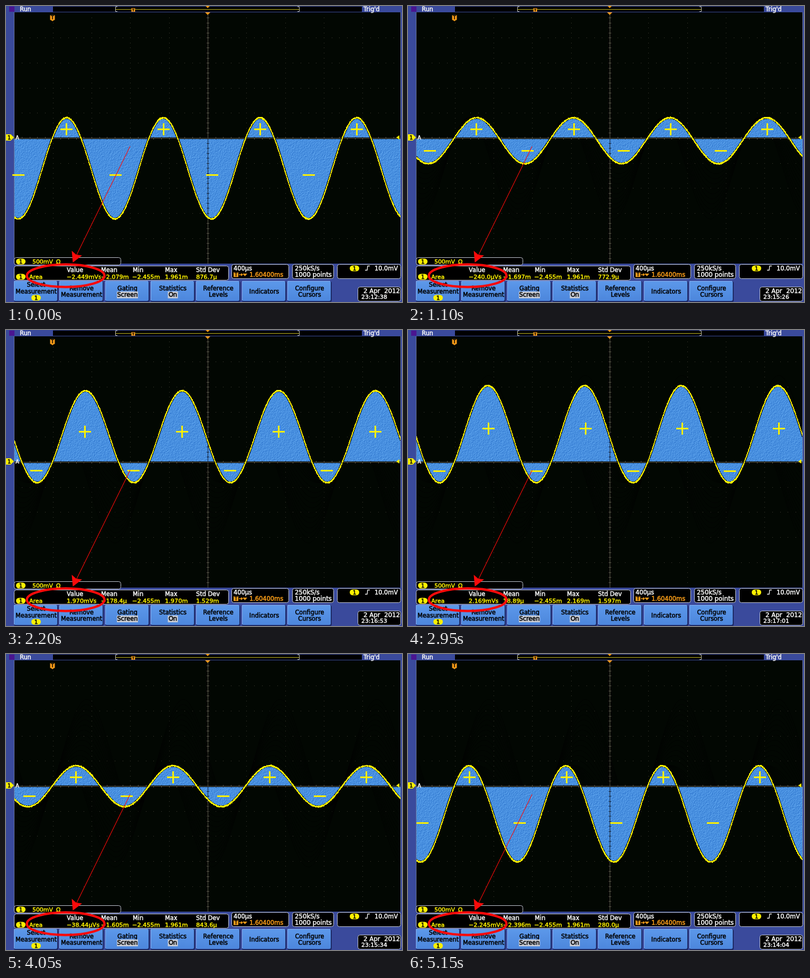
Animation, 750 px wide and 563 px high, one loop 5250 ms. Source, as an HTML page with a canvas:

```html
<!DOCTYPE html>
<html lang="en">
<head>
<meta charset="utf-8">
<title>Oscilloscope area measurement</title>
<style>
html, body { margin: 0; width: 100%; height: 100%; overflow: hidden; background: #3a4a9c; }
canvas { display: block; }
</style>
</head>
<body>
<canvas id="scope" width="750" height="563"></canvas>
<script>
const ctx = document.getElementById('scope').getContext('2d');
const YELLOW = '#fcf000', ORANGE = '#f59a18', WHITE = '#f4f4f4', RED = '#fa0a0a', DARK = '#020702';
const PLOT = { left: 15, top: 12, right: 748, bottom: 490 };
const WIDTH = PLOT.right - PLOT.left, HEIGHT = PLOT.bottom - PLOT.top;
const LEVEL = 250.5, AXIS_Y = 251, AXIS_X = 382, TRIGGER_X = 88, PERIOD = 183.1;
const GRID_X = 73.3 / 5, GRID_Y = 47.65 / 5;
const LOOP = 5250, LAST = 26;

// step, plus x, plus y, minus x, minus y, value, mean, deviation (mVs), seconds after 23:12
const KEYS = [
  [0, 114, 234, 24, 321, -2.449, -2.079, .8767, 38],
  [1, 116, 234, 28, 321, -2.245, -2.396, .28, 124],
  [7, 120.5, 236, 31, 297, -1.046, -2.063, .4899, 175],
  [12, 131.5, 234, 45, 270, -.03844, -1.605, .8436, 214],
  [15, 140.5, 221, 50, 270, .5663, -1.197, 1.087, 237],
  [22, 148.5, 193, 58, 267, 1.970, -.1784, 1.529, 293],
  [23, 151.5, 186.5, 60, 268, 2.169, .01889, 1.597, 301],
  [26, 153.5, 172, 61, 268, 2.769, .5512, 1.762, 325]
];

function stateAt(step) {
  const i = Math.max(1, KEYS.findIndex(k => k[0] >= step));
  const a = KEYS[i - 1], b = KEYS[i];
  if (step === b[0]) return b;
  const f = (step - a[0]) / (b[0] - a[0]);
  return a.map((v, n) => v + (b[n] - v) * f);
}

function hash(n) {
  const v = Math.sin(n * 127.1 + 11.7) * 43758.5453;
  return v - Math.floor(v);
}

// The trough rises first, then the crest; the rising edge stays at the trigger.
function waveAt(step, inset = 0) {
  const top = 212.5 - 9.7 * Math.max(0, step - 12);
  const bottom = 405 - 9.55 * Math.min(12, step);
  const mid = (top + bottom) / 2, amp = (bottom - top) / 2;
  const phase = Math.asin((mid - LEVEL) / amp);
  return x => mid - (amp - inset) * Math.sin(phase + (x - TRIGGER_X) * 2 * Math.PI / PERIOD);
}

function makeTexture() {
  const size = 128, tile = document.createElement('canvas');
  tile.width = tile.height = size;
  const c = tile.getContext('2d'), img = c.createImageData(size, size);
  const at = (x, y) => hash(((y + size) % size) * size + (x + size) % size);
  const soft = (x, y) => (at(x, y) * 2 + at(x + 1, y) + at(x, y + 1)) / 4;
  for (let y = 0; y < size; y++) for (let x = 0; x < size; x++) {
    const d = (soft(x + 1, y + 1) - soft(x, y)) * 46;
    img.data.set([72 + d, 143 + d, 223 + d * .7, 255], (y * size + x) * 4);
  }
  c.putImageData(img, 0, 0);
  return ctx.createPattern(tile, 'repeat');
}
const texture = makeTexture();

function rect(x, y, w, h, color) {
  ctx.fillStyle = color;
  ctx.fillRect(x, y, w, h);
}

function shape(points, color) {
  ctx.fillStyle = color;
  ctx.beginPath();
  points.forEach(([x, y]) => ctx.lineTo(x, y));
  ctx.fill();
}

function line(points, color, width = 1) {
  ctx.strokeStyle = color;
  ctx.lineWidth = width;
  ctx.beginPath();
  points.forEach(([x, y]) => ctx.lineTo(x, y));
  ctx.stroke();
}

function text(str, x, y, color = WHITE, size = 11.4, align = 'left') {
  ctx.font = size + 'px "DejaVu Sans", sans-serif';
  ctx.textAlign = align;
  ctx.fillStyle = ctx.strokeStyle = color;
  ctx.lineWidth = .55;
  ctx.lineJoin = 'round';
  ctx.fillText(str, x, y);
  ctx.strokeText(str, x, y);
  ctx.lineJoin = 'miter';
}

function box(x, y, w, h) {
  ctx.beginPath();
  ctx.roundRect(x + .5, y + .5, w - 1, h - 1, 4);
  ctx.fillStyle = '#000';
  ctx.fill();
  ctx.strokeStyle = '#c4c8d4';
  ctx.lineWidth = 1;
  ctx.stroke();
}

function badge(x, y) {
  ctx.fillStyle = YELLOW;
  ctx.beginPath();
  ctx.roundRect(x - 9, y - 5.5, 18, 11, 5.5);
  ctx.fill();
  text('1', x, y + 4, '#000', 10.5, 'center');
}

function triggerTag(x, y, size) {
  rect(x - size / 2, y - size / 2, size, size, ORANGE);
  text('T', x, y + size * .36, '#000', size * .95, 'center');
}

function drawGrid() {
  rect(PLOT.left, PLOT.top, WIDTH, HEIGHT, DARK);
  for (let i = -24; i <= 24; i++) for (let j = -24; j <= 24; j++) {
    if (i % 5 && j % 5) continue;
    rect(Math.round(AXIS_X + i * GRID_X), Math.round(AXIS_Y + j * GRID_Y), 1, 1, '#48463a');
  }
  drawAxes('#5c574b');
}

function drawAxes(color) {
  rect(PLOT.left, AXIS_Y, WIDTH, 1, color);
  rect(AXIS_X, PLOT.top, 1, HEIGHT, color);
  for (let i = -24; i <= 24; i++) {
    rect(Math.round(AXIS_X + i * GRID_X), AXIS_Y - 2, 1, 5, color);
    rect(AXIS_X - 2, Math.round(AXIS_Y + i * GRID_Y), 5, 1, color);
  }
}

function pathWave(wave) {
  ctx.beginPath();
  for (let x = PLOT.left; x <= PLOT.right; x++) ctx.lineTo(x, wave(x));
}

function strokeWave(wave, color, width) {
  pathWave(wave);
  ctx.strokeStyle = color;
  ctx.lineWidth = width;
  ctx.stroke();
}

// One noisy upright dash per column, as the sampled signal looks on screen
function drawTrace(wave, seed) {
  for (let x = PLOT.left; x < PLOT.right; x++) {
    const a = wave(x), b = wave(x + 1);
    const top = Math.min(a, b) - .8 - 1.4 * hash(x + seed * 971);
    const bottom = Math.max(a, b) + .8 + 1.4 * hash(x + seed * 389 + .5);
    rect(x, Math.round(top), 1, Math.round(bottom) - Math.round(top), YELLOW);
  }
}

function fillAreas(step) {
  ctx.save();
  pathWave(waveAt(step, 2));
  ctx.lineTo(PLOT.right, AXIS_Y);
  ctx.lineTo(PLOT.left, AXIS_Y);
  ctx.closePath();
  ctx.clip();
  rect(PLOT.left, PLOT.top, WIDTH, AXIS_Y - 1 - PLOT.top, texture);
  rect(PLOT.left, AXIS_Y + 2, WIDTH, PLOT.bottom - AXIS_Y - 2, texture);
  drawAxes('#142238');
  ctx.restore();
  rect(PLOT.left, AXIS_Y, WIDTH, 1, '#5c574b');
}

function drawSigns(px, py, mx, my) {
  for (const shift of [0, 184.3, 367.2, 550.3]) {
    const x = Math.round(px + shift), m = Math.round(mx + shift);
    const y = Math.round(py), n = Math.round(my);
    rect(x - 11, y - 1, 23, 3, YELLOW);
    rect(x - 1, y - 11, 3, 23, YELLOW);
    rect(m - 12, n - 1, 23, 3, YELLOW);
  }
}

function drawPlot(index, step, state) {
  const wave = waveAt(step);
  drawGrid();
  ctx.save();
  ctx.beginPath();
  ctx.rect(PLOT.left, PLOT.top, WIDTH, HEIGHT);
  ctx.clip();
  // Faint dark afterglow of the earlier traces
  for (let i = 0; i < Math.min(index, LAST); i++) strokeWave(waveAt(i), 'rgba(0,0,0,.4)', 1.5);
  fillAreas(step);
  strokeWave(wave, DARK, 4);
  drawTrace(wave, step + 1);
  ctx.restore();
  line([[15.5, 12], [15.5, 490]], '#68749c');
  line([[747.5, 12], [747.5, 490]], '#68749c');
  drawSigns(...state.slice(1, 5));
}

function drawMarkers() {
  rect(6, 1, 10, 10, '#4a1590');
  text('Run', 26, 10);
  text('Trig\'d', 677, 10);
  rect(89, 1, 585, 10, '#000');
  line([[207, 6.5], [555, 6.5]], '#c4b820');
  line([[211, 1.5], [207.5, 1.5], [207.5, 10.5], [211, 10.5]], '#c8c8b8');
  line([[552, 1.5], [555.5, 1.5], [555.5, 10.5], [552, 10.5]], '#c8c8b8');
  triggerTag(241, 7.5, 7);
  shape([[378, 0], [386, 0], [382, 4]], ORANGE);
  shape([[377, 12], [387, 12], [382, 17]], ORANGE);
  triggerTag(88, 22, 9);
  shape([[84, 26], [92, 26], [88, 29]], ORANGE);
  shape([[0, 244], [9, 244], [15, 250], [9, 256], [0, 256]], YELLOW);
  text('1', 6, 254, '#000', 10.5, 'center');
  text('A', 18, 254, WHITE, 10);
  shape([[739, 250], [745, 246], [745, 254]], YELLOW);
}

function amount(v) {
  const str = Math.abs(v) >= 1 ? v.toFixed(3) + 'm' : (v * 1000).toPrecision(4) + 'µ';
  return str.replace('-', '−');
}

function drawReadout([, , , , , value, mean, dev, secs]) {
  box(15, 478, 203, 15);
  badge(28, 486);
  text('500mV', 50, 490, YELLOW, 10.9);
  text('Ω', 95, 490, YELLOW, 10.9);

  box(15, 494, 407, 28);
  ['Value', 'Mean', 'Min', 'Max', 'Std Dev'].forEach((name, i) =>
    text(name, [115, 180, 240, 301, 360][i], 506));
  badge(28, 515);
  text('Area', 44, 519, YELLOW, 11);
  ctx.save();
  ctx.beginPath();
  ctx.rect(100, 508, 79.5, 13);
  ctx.clip();
  text(amount(value) + 'Vs', 115, 519, YELLOW, 11.2);
  ctx.restore();
  [mean, -2.455, Math.max(1.961, value), dev].forEach((v, i) =>
    text(amount(v), [180, 239, 301, 360][i], 519, YELLOW, 11.3));

  box(427, 491, 109, 28);
  text('400µs', 431, 503);
  triggerTag(435.5, 511, 9);
  line([[441, 511], [446, 511]], ORANGE, 1.5);
  shape([[445, 508], [449, 511], [445, 514]], ORANGE);
  shape([[448, 509], [457, 509], [452.5, 514]], ORANGE);
  text('1.60400ms', 461, 515, ORANGE);

  box(542, 491, 79, 28);
  text('250kS/s', 547, 503, WHITE, 11.8);
  text('1000 points', 547, 515, WHITE, 11.8);

  box(627, 491, 121, 28);
  badge(660, 499);
  line([[680, 502.5], [684, 502.5], [685, 494.5], [689, 494.5]], WHITE, 1.4);
  text('10.0mV', 698, 503);

  const pad = n => String(n).padStart(2, '0'), s = Math.round(secs);
  box(666, 534, 82, 28);
  text('2 Apr  2012', 677, 546, WHITE, 11.8);
  text('23:' + pad(12 + Math.floor(s / 60)) + ':' + pad(s % 60), 673, 557, WHITE, 10.9);
}

function drawButtons() {
  const labels = [
    ['Select', 'Measurement'], ['Remove', 'Measurement'], ['Gating', 'Screen'],
    ['Statistics', 'On'], ['Reference', 'Levels'], ['Indicators'], ['Configure', 'Cursors']
  ];
  labels.forEach((words, i) => {
    const x = Math.round(15 + i * 86.3), mid = x + 42;
    ctx.fillStyle = '#1d2a66';
    ctx.beginPath();
    ctx.roundRect(x, 524, 84, 39, 3);
    ctx.fill();
    const face = ctx.createLinearGradient(0, 523, 0, 562);
    face.addColorStop(0, '#5c98ea');
    face.addColorStop(1, '#4c86dc');
    ctx.fillStyle = face;
    ctx.beginPath();
    ctx.roundRect(x, 523, 82, 38, 3);
    ctx.fill();
    line([[x + .5, 560], [x + .5, 523.5], [x + 81, 523.5]], '#86b2f2');
    const first = words.length === 1 ? 547 : i ? 541 : 534;
    words.forEach((word, row) => {
      const y = first + row * (i ? 12 : 13);
      if (row && (i === 2 || i === 3)) {
        const w = i === 2 ? 40 : 19;
        rect(mid - w / 2, 543, w, 13, '#c6cad4');
      }
      text(word, mid, y, '#000', 11.4, 'center');
    });
  });
  badge(57, 555);
}

function drawCallout() {
  ctx.strokeStyle = RED;
  ctx.lineWidth = 4.4;
  ctx.beginPath();
  ctx.ellipse(113, 513, 73.5, 21.5, 0, 0, 2 * Math.PI);
  ctx.stroke();
  line([[235, 267], [133, 475]], RED, 1.1);
  shape([[126.5, 488], [124.5, 465.5], [133, 473], [144, 474.5]], RED);
}

function draw(index) {
  const step = index <= LAST ? index : 2 * LAST - index;
  const state = stateAt(step);
  rect(0, 0, 750, 563, '#3a4a9c');
  drawPlot(index, step, state);
  drawMarkers();
  drawReadout(state);
  drawButtons();
  drawCallout();
}

// The topmost pose is held 50 ms longer than the others.
function indexAt(t) {
  return t < 2750 ? Math.min(LAST, Math.floor(t / 100)) : LAST + 1 + Math.floor((t - 2750) / 100);
}

const start = performance.now();
let shown = -1;
function tick() {
  const index = indexAt((performance.now() - start) % LOOP);
  if (index !== shown) draw(shown = index);
  requestAnimationFrame(tick);
}
tick();
</script>
</body>
</html>
```
